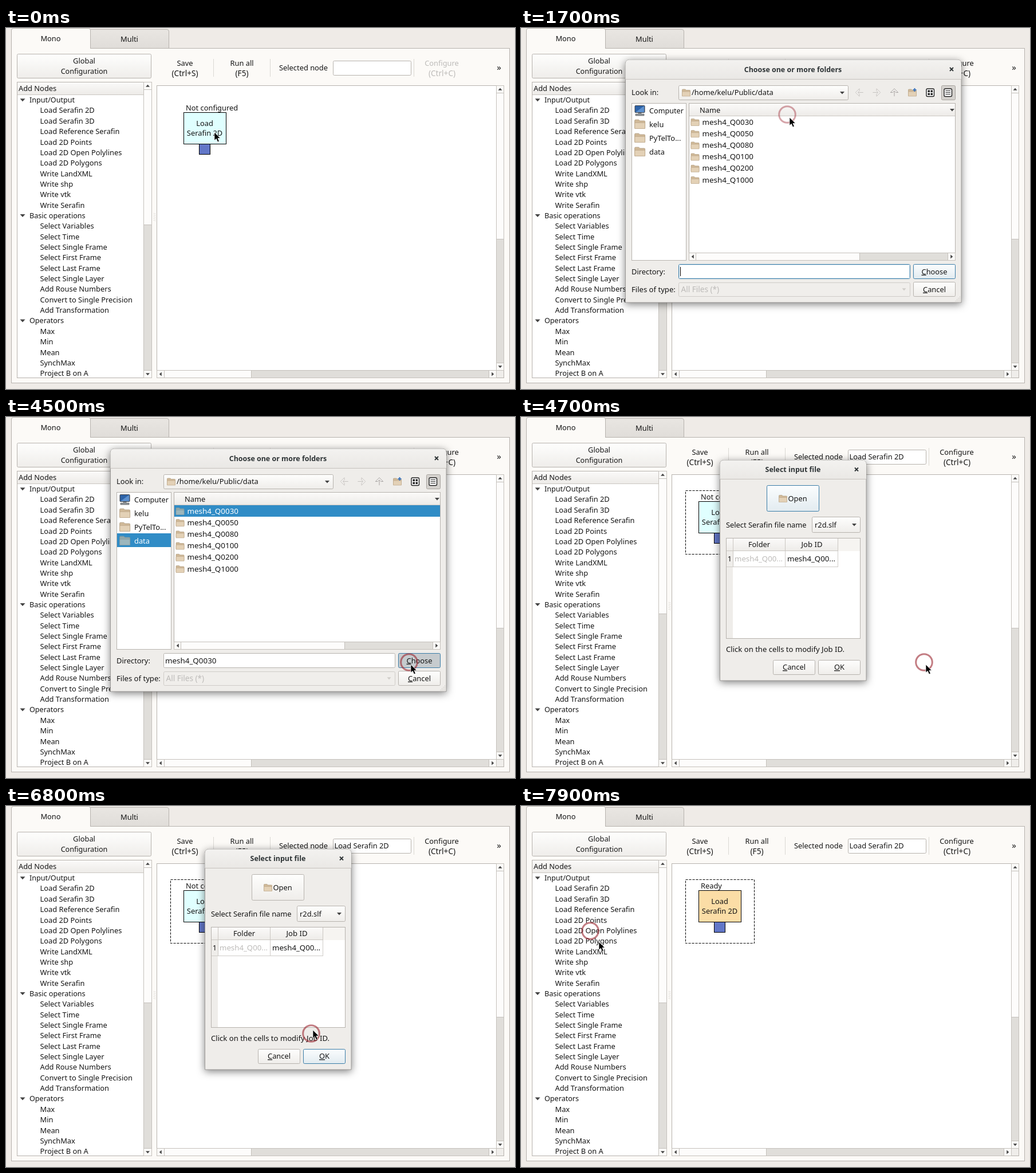
Write an HTML page that moves like this. It is 889 px wide and 630 px high and loops after 8000 ms.

```html
<!DOCTYPE html>
<html lang="en">
<head>
<meta charset="utf-8">
<title>Node editor</title>
<style>
html, body { margin: 0; width: 100%; height: 100%; overflow: hidden; background: #efebe7; }
svg { display: block; width: 889px; height: 630px; }
text { font-family: "Noto Sans", "Open Sans", sans-serif; white-space: pre; }
.win { filter: drop-shadow(0 3px 7px rgba(0, 0, 0, .5)); }
</style>
</head>
<body>
<svg id="stage" viewBox="0 0 889 630" xmlns="http://www.w3.org/2000/svg"></svg>
<script>
const LOOP = 8000, STEP = 100;
const INK = '#151515', LINE = '#b7b3ae', BG = '#efedea', BLUE = '#308cc6', FOCUS = '#3a7da8', DIM = '#bdbbb9';
const PRESSED = '#c6cbce', PLAIN = 'url(#btn)', PRIMARY = 'url(#primary)';

const attrs = o => Object.entries(o).map(([k, v]) => ` ${k}="${v}"`).join('');
const rect = (x, y, x2, y2, fill, stroke = 'none', o = {}) =>
  `<rect${attrs({ x, y, width: x2 - x, height: y2 - y, fill, stroke, ...o })}/>`;
const path = (d, fill = 'none', stroke = 'none', o = {}) => `<path${attrs({ d, fill, stroke, ...o })}/>`;
const group = (id, body, o = {}) => `<g${attrs({ id, ...o })}>${body}</g>`;
// y is the middle of the capital letters
const text = (x, y, s, o = {}) =>
  `<text${attrs({ x, y: y + 4.6, 'font-size': 12.85, fill: INK, ...o })}>${s}</text>`;
const mid = (x, y, s, o = {}) => text(x, y, s, { 'text-anchor': 'middle', ...o });
const shortcut = (x, y, s, o = {}) => mid(x, y, s, { 'font-size': 13.6, ...o });
const gradient = (id, a, b) =>
  `<linearGradient id="${id}" x2="0" y2="1"><stop stop-color="${a}"/><stop offset="1" stop-color="${b}"/></linearGradient>`;
const key = s => `<tspan text-decoration="underline">${s[0]}</tspan>${s.slice(1)}`;

const button = (x, y, x2, y2, stroke = LINE, o = {}) => rect(x, y, x2, y2, PLAIN, stroke, { rx: 2, ...o });
const field = (x, y, x2, y2, stroke = LINE, o = {}) => rect(x, y, x2, y2, '#fff', stroke, { rx: 2, ...o });
const rule = (x, y, x2, y2, stroke = LINE) => path(`M${x} ${y}L${x2} ${y2}`, 'none', stroke);

function arrow(x, y, dir, r = 3.5, fill = '#444') {
  const turn = { down: 0, left: 90, up: 180, right: 270 }[dir];
  return path(`M${-r} ${-r / 2}H${r}L0 ${r / 2 + .5}Z`, fill, 'none', { transform: `translate(${x} ${y}) rotate(${turn})` });
}

// A bar along one axis: buttons at both ends, handle from a to b
function scrollbar(x, y, x2, y2, a, b, vertical) {
  const cx = (x + x2) / 2, cy = (y + y2) / 2;
  const box = (p, q, fill) => vertical ? rect(x, p, x2, q, fill, '#c5c1bc') : rect(p, y, q, y2, fill, '#c5c1bc');
  const [p, q] = vertical ? [y, y2] : [x, x2];
  const ends = vertical
    ? arrow(cx, y + 6.5, 'up') + arrow(cx, y2 - 6.5, 'down')
    : arrow(x + 6.5, cy, 'left') + arrow(x2 - 6.5, cy, 'right');
  return box(p, q, '#e0deda') + box(p, a, '#fbfaf8') + box(a, b, '#fdfcfb') + box(q - 13, q, '#fbfaf8') + ends;
}

function folder(x, y, s = 1) {
  return `<g transform="translate(${x} ${y}) scale(${s})">`
    + path('M.5 1.5Q.5.5 1.5.5H6L7.5 2H13.5Q14.5 2 14.5 3V11.5H.5Z', '#d0b998', '#b09c80', { 'stroke-width': .7 })
    + path('M1.5 4.5H14.5V12.5H.5V5.5Z', '#e3d1b6', '#bda88b', { 'stroke-width': .7 }) + '</g>';
}

function windowFrame(x, y, x2, y2, barY, title, titleX, titleY, closeX) {
  const top = `M${x} ${barY}V${y + 7}Q${x} ${y} ${x + 7} ${y}H${x2 - 7}Q${x2} ${y} ${x2} ${y + 7}V${barY}`;
  return path(`${top}V${y2}H${x}Z`, BG, '#8f8c88', { class: 'win', 'stroke-width': .8 })
    + path(`${top}Z`, 'url(#bar)') + rule(x, barY + .5, x2, barY + .5, '#c6c2be')
    + mid(titleX, titleY, title, { 'font-size': 12.45, 'font-weight': 700, fill: '#2e3436' })
    + path(`M${closeX - 3} ${titleY - 3}l6 6m0-6l-6 6`, 'none', '#2e3436', { 'stroke-width': 1.9 });
}

function tree() {
  const sections = {
    'Input/Output': ['Load Serafin 2D', 'Load Serafin 3D', 'Load Reference Serafin', 'Load 2D Points',
      'Load 2D Open Polylines', 'Load 2D Polygons', 'Write LandXML', 'Write shp', 'Write vtk', 'Write Serafin'],
    'Basic operations': ['Select Variables', 'Select Time', 'Select Single Frame', 'Select First Frame',
      'Select Last Frame', 'Select Single Layer', 'Add Rouse Numbers', 'Convert to Single Precision', 'Add Transformation'],
    'Operators': ['Max', 'Min', 'Mean', 'SynchMax', 'Project B on A'],
  };
  let y = 125.5, out = '';
  for (const [name, items] of Object.entries(sections)) {
    out += arrow(29, y, 'down', 4.5) + text(41, y, name, { 'font-size': 12.6 });
    y += 18.35;
    for (const item of items) {
      out += text(59.5, y, item);
      y += 18.35;
    }
  }
  return out;
}

function mainWindow() {
  let dots = '';
  for (let y = 323; y < 338; y += 3) dots += rect(258, y, 259, y + 1, '#cfcac5') + rect(260, y + 1, 261, y + 2, '#cfcac5');
  return rect(0, 0, 889, 630, '#efebe7')
    + path('M147.5 35.5V2.5H281Q284.5 2.5 284.5 6V35.5Z', 'url(#tab)', LINE)
    + rect(9.5, 35.5, 879.5, 619.5, '#fcfaf7', LINE)
    + path('M9.5 37V4Q9.5 .5 13 .5H144Q147.5 .5 147.5 4V36', '#fcfaf7', LINE) + rect(10, 34, 147, 38, '#fcfaf7')
    + mid(78, 18, 'Mono') + mid(215.5, 19, 'Multi')
    + button(19.5, 45.5, 253.5, 87.5) + mid(136.5, 57.5, 'Global') + mid(136.5, 75, 'Configuration', { 'font-size': 12.6 })
    + rect(19.5, 94.5, 254.5, 610.5, '#fff', LINE) + rect(20, 95, 240, 116, 'url(#head)') + rule(20, 116.5, 240, 116.5, '#cbc7c2')
    + text(22, 105, 'Add Nodes') + tree() + scrollbar(240.5, 94.5, 254.5, 610.5, 107.5, 343.5, true) + dots
    + mid(312.5, 61.5, 'Save') + shortcut(312.5, 79, '(Ctrl+S)') + mid(412, 61.5, 'Run all') + shortcut(412, 79, '(F5)')
    + [362.5, 461.5, 712.5].map(x => rule(x, 54, x, 85, '#dbd8d4')).join('')
    + text(477, 69.5, 'Selected node') + field(571.5, 57.5, 707.5, 82.5)
    + group('nodeName', text(573.5, 69.5, 'Load Serafin 2D'))
    + group('configure', mid(761, 61.5, 'Configure', { fill: 'inherit' }) + shortcut(761.5, 79, '(Ctrl+C)', { fill: 'inherit' }))
    + mid(861, 69, '»', { 'font-size': 15 })
    + rect(263.5, 100.5, 869.5, 610.5, '#fff', LINE) + rect(856, 597, 869, 610, BG)
    + scrollbar(856.5, 100.5, 869.5, 597.5, 113.5, 368.5, true)
    + scrollbar(263.5, 597.5, 856.5, 610.5, 276.5, 428.5, false)
    + group('outline', rect(287.5, 128.5, 407.5, 239.5, 'none', '#000', { 'stroke-dasharray': '4 2' }))
    + group('waiting', text(314, 139.5, 'Not configured')) + group('ready', text(314, 139.5, 'Ready'))
    + rect(310.5, 147.5, 384.5, 202.5, '#e0ffff', '#000', { id: 'node' })
    + mid(347, 166, 'Load') + mid(347, 183.5, 'Serafin 2D')
    + rect(337.5, 202.5, 356.5, 220.5, '#6277c8', '#000');
}

function inputDialog() {
  const row = mid(364.5, 247, '1') + text(373, 247, 'mesh4_Q00...', { 'font-size': 13.25, fill: DIM })
    + text(465, 247, 'mesh4_Q00...', { 'font-size': 13.25 })
    + rule(359, 261.5, 554, 261.5, '#cfccc8') + rule(461.5, 234, 461.5, 261, '#cfccc8') + rule(553.5, 234, 553.5, 261, '#cfccc8');
  return windowFrame(347.5, 75.5, 603, 460, 108, 'Select input file', 475, 91.5, 586)
    + button(429.5, 119.5, 520.5, 164.5, LINE, { id: 'open' }) + folder(450, 136) + text(466.5, 142, 'Open')
    + text(358, 188, 'Select Serafin file name') + button(508.5, 174.5, 592.5, 201.5) + arrow(582, 188, 'down', 4)
    + rect(358.5, 211.5, 592.5, 386.5, '#fff', LINE) + rect(359, 212, 370, 386, BG) + rect(359, 212, 592, 234, '#f6f4f1')
    + rect(359, 212, 554, 234, 'url(#head)') + rule(359, 233.5, 554, 233.5, '#cbc7c2')
    + [370.5, 461.5, 553.5].map(x => rule(x, 212, x, 234, '#cbc7c2')).join('') + rule(370.5, 234, 370.5, 261, '#cbc7c2')
    + mid(416, 222.5, 'Folder') + mid(508, 222.5, 'Job ID', { 'font-size': 13.1 })
    + group('loaded', text(513, 188, 'r2d.slf') + row)
    + text(358, 405.5, 'Click on the cells to modify Job ID.', { 'font-size': 13.1 })
    + button(440.5, 424.5, 513.5, 449.5) + mid(477, 436.5, key('Cancel'))
    + button(519.5, 424.5, 592.5, 449.5, LINE, { id: 'ok' }) + mid(556, 436.5, key('OK'))
    + group('popup', rect(507.5, 173.5, 615.5, 203.5, '#fbfaf8', '#a9a5a0') + rect(509, 175, 614, 202, BLUE)
      + path('M514 188l3 3l5-6', 'none', '#fff', { 'stroke-width': 1.8 }) + text(530, 188, 'r2d.slf', { fill: '#fff' }));
}

function toolIcons() {
  const shape = 'M-7 0L0-7V-3L-3 0L0 3V7ZM-2 0H7';
  const nav = (x, turn, stroke) => path(shape, '#f4f2f0', stroke, { transform: `translate(${x} 112.5) rotate(${turn}) scale(.95)` });
  let grid = rect(708, 106, 721.5, 119.5, '#fff', '#222', { rx: 2, 'stroke-width': 1.4 });
  for (const x of [710.5, 715.5]) for (const y of [108.5, 113.5]) grid += rect(x, y, x + 3.5, y + 3.5, '#222');
  let list = rect(734.5, 100.5, 758.5, 125.5, '#d5d2ce', '#a8a49f', { rx: 2 })
    + rect(739, 106, 752.5, 119.5, '#fff', '#222', { rx: 2, 'stroke-width': 1.4 });
  for (const y of [109.5, 112.5, 115.5]) list += rule(741.5, y, 750, y, '#222');
  return nav(591, 0, '#c4c1be') + nav(621, 180, '#c4c1be') + nav(652, 90, '#a3a09d')
    + folder(676, 106.5) + path('M687.5 105v6m-3-3h6', 'none', '#3f76bd', { 'stroke-width': 2.2 }) + grid + list;
}

function folderDialog() {
  const places = ['kelu', 'PyTelTo...', 'data'].map((s, i) => {
    const y = 168 + 24 * i;
    return folder(198, y - 8.5, 1.28) + text(224, y, s, { id: 'place' + i });
  }).join('');
  const rows = ['0030', '0050', '0080', '0100', '0200', '1000'].map((s, i) => {
    const y = 164 + 20.2 * i;
    return folder(296.5, y - 6) + text(316.5, y, 'mesh4_Q' + s, { 'font-size': 13.4, id: 'row' + i });
  }).join('');
  let grip = '';
  for (let i = 0; i < 4; i++) for (let j = 0; j <= i; j++) grip += rect(766 - 2.5 * j, 468.5 + 2.5 * i, 767 - 2.5 * j, 469.5 + 2.5 * i, '#bbb7b2');
  return windowFrame(182.5, 55.5, 769, 479, 89, 'Choose one or more folders', 475, 72, 752)
    + text(193, 112.5, 'Look in:') + button(275.5, 100.5, 571.5, 125.5) + folder(281, 106.5)
    + text(298, 112.5, '/home/kelu/Public/data') + arrow(561, 113, 'down', 4) + toolIcons()
    + rect(193.5, 131.5, 288.5, 405.5, '#fff', LINE)
    + rect(199, 135.5, 216, 147.5, '#2d63a8', '#3b3f45', { rx: 1 }) + path('M200 147L215 136V147Z', '#5d91cf')
    + path('M205 148h5v2h5v3h-15v-3h5Z', '#8d9297', '#555', { 'stroke-width': .6 })
    + text(224, 144, 'Computer', { 'font-size': 12.65 })
    + group('placeBar', rect(194, 203, 288, 227, BLUE)) + places
    + group('placeTint', rect(198, 207, 218, 224, BLUE, 'none', { opacity: .4 }))
    + rect(293.5, 131.5, 758.5, 405.5, '#fff', LINE) + rect(294, 132, 758, 153, 'url(#head)') + rule(294, 153.5, 758, 153.5, '#cbc7c2')
    + text(312, 143, 'Name') + arrow(753, 143, 'down', 4)
    + group('rowBar', rect(294, 154, 758, 174, BLUE)) + rows
    + group('rowTint', rect(296, 158, 312, 171, BLUE, 'none', { opacity: .4 }))
    + scrollbar(293.5, 392.5, 758.5, 405.5, 305.5, 591.5, false)
    + text(193, 425, 'Directory:') + field(275.5, 412.5, 679.5, 437.5, LINE, { id: 'dir' })
    + group('caret', rect(276.5, 413.5, 678.5, 436.5, 'none', '#d3e5f0') + rule(278.5, 417, 278.5, 433, '#000'))
    + group('dirName', text(278, 425, 'mesh4_Q0030', { 'font-size': 13.4 }))
    + button(685.5, 412.5, 758.5, 437.5, FOCUS, { id: 'choose' }) + mid(722, 425, key('Choose'))
    + text(193, 456, 'Files of type:', { 'font-size': 13.1 }) + rect(275.5, 444.5, 679.5, 468.5, '#f0eeeb', '#cfccc8', { rx: 2 })
    + text(279.5, 456, 'All Files (*)', { 'font-size': 13.6, fill: DIM }) + arrow(669, 456, 'down', 3.5, '#cfccc8')
    + button(685.5, 443.5, 758.5, 468.5) + mid(722, 456, key('Cancel')) + grip;
}

const stage = document.getElementById('stage');
stage.innerHTML = '<defs>' + gradient('btn', '#fefefd', '#efedea') + gradient('primary', '#fbfdfe', '#e2ebf0')
  + gradient('head', '#fbfaf9', '#edebe8') + gradient('bar', '#f3f2f0', '#eae8e5') + gradient('tab', '#e9e6e2', '#e0ddd9') + '</defs>'
  + mainWindow() + group('inputDialog', inputDialog()) + group('folderDialog', folderDialog())
  + `<circle${attrs({ id: 'ring', r: 14.3, fill: 'none', stroke: '#981f2a', 'stroke-width': 3 })}/>`
  + group('cursor', path('M0 0V14.2L3.3 11.2L5.7 16.8L8.3 15.7L5.9 10.3H10.3Z', '#000', '#fff', { 'stroke-width': .7 }));

const el = {};
stage.querySelectorAll('[id]').forEach(n => el[n.id] = n);
const set = (id, name, value) => el[id].setAttribute(name, value);
const show = (id, on) => set(id, 'visibility', on ? 'visible' : 'hidden');

// time, pointer tip, offset of the ring from the tip
const track = [
  [0, 364, 182], [200, 352, 174], [800, 352, 174], [1100, 470, 150], [1700, 469, 156, -4, -5], [2400, 247, 222],
  [2700, 246, 221], [3400, 383, 175], [3600, 381, 172], [4300, 707, 432], [4700, 707, 432], [5300, 580, 158],
  [5600, 545, 187, -6, 2], [5700, 542, 191], [5900, 542, 191], [6800, 536, 391, -3, 6], [7000, 570, 435],
  [7300, 574, 435], [7600, 597, 436], [7900, 136, 237, -15, -19],
];

function pointer(t) {
  const i = Math.max(1, track.findIndex(k => k[0] >= t));
  const [t0, x0, y0, u0 = -3, v0 = -4] = track[i - 1], [t1, x1, y1, u1 = -3, v1 = -4] = track[i];
  const p = (t - t0) / (t1 - t0), e = p * p * (3 - 2 * p);
  return [[x0, x1], [y0, y1], [u0, u1], [v0, v1]].map(([a, b]) => a + (b - a) * e);
}

const within = (t, a, b) => t >= a && t < b;

function update(ms) {
  const t = Math.floor(ms % LOOP / STEP) * STEP;
  const selected = t >= 400, done = t >= 7200;
  show('nodeName', selected);
  show('outline', selected);
  set('configure', 'fill', selected ? INK : DIM);
  show('waiting', !done);
  show('ready', done);
  set('node', 'fill', done ? '#fbdda6' : '#e0ffff');

  const input = within(t, 500, 7200), loaded = t >= 4700;
  set('inputDialog', 'display', input ? 'inline' : 'none');
  show('loaded', loaded);
  show('popup', within(t, 5700, 6000));
  set('open', 'stroke', t < 5700 ? FOCUS : LINE);
  set('open', 'fill', within(t, 1100, 1300) ? PRESSED : t < 5700 ? PRIMARY : PLAIN);
  set('ok', 'stroke', t < 5700 ? LINE : FOCUS);
  set('ok', 'fill', t >= 7100 ? PRESSED : t < 5700 ? PLAIN : PRIMARY);

  const place = t >= 2500, row = t >= 3600;
  set('folderDialog', 'display', within(t, 1200, 4700) ? 'inline' : 'none');
  for (const id of ['placeBar', 'placeTint']) show(id, place);
  for (const id of ['rowBar', 'rowTint', 'dirName']) show(id, row);
  set('place2', 'fill', place ? '#fff' : INK);
  set('row0', 'fill', row ? '#fff' : INK);
  set('dir', 'stroke', place ? LINE : FOCUS);
  show('caret', !place);
  set('choose', 'fill', t >= 4500 ? PRESSED : PRIMARY);

  const [x, y, u, v] = pointer(Math.min(t, 7900));
  set('cursor', 'transform', `translate(${x} ${y})`);
  set('ring', 'cx', x + u);
  set('ring', 'cy', y + v);
  show('ring', t >= 900);
  set('ring', 'stroke-opacity', within(t, 1400, 1800) ? .4 : .58);
}

function frame(now) {
  update(now);
  requestAnimationFrame(frame);
}
update(0);
requestAnimationFrame(frame);
</script>
</body>
</html>
```
